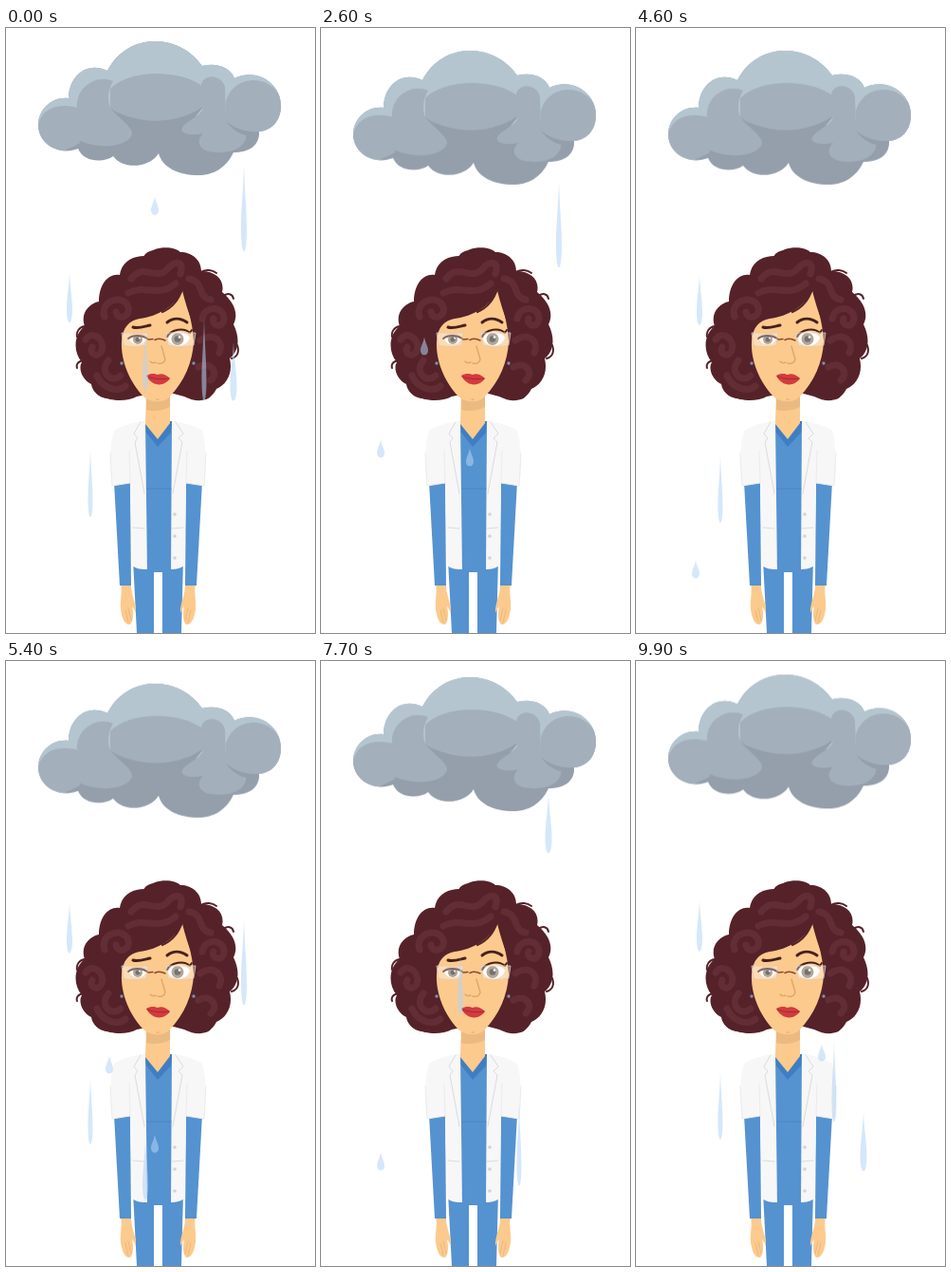
Animation of 326x637 px, one loop 10 s. Source, as an HTML page:

```html
<!DOCTYPE html>
<html lang="en">
<head>
<meta charset="utf-8">
<title>Rainy mood</title>
<style>
  html, body { margin: 0; width: 100%; height: 100%; overflow: hidden; background: #fff; }
  svg { display: block; width: 100vw; height: 100vh; }
  #cloud { animation: bob 1s cubic-bezier(.364, 0, .636, 1) infinite alternate; }
  @keyframes bob { to { transform: translateY(15px); } }
  .line { fill: none; stroke-linecap: round; stroke-linejoin: round; }
</style>
</head>
<body>
<svg viewBox="0 0 326 637">
  <defs>
    <clipPath id="cloudEdge">
      <path id="cloudShape" d="M34 102C34 86 48 72 66 74C66 52 84 34 107 45C118 24 137 14 157 14C180 14 197 26 207 40C221 36 237 41 241 53C262 42 290 56 290 82C290 98 280 108 267 109C268 124 256 131 240 131C232 148 218 155 203 155C182 155 165 147 161 132C152 147 124 150 113 135C104 142 82 142 76 127C56 135 34 122 34 102Z"/>
    </clipPath>
    <clipPath id="hairEdge">
      <path id="hairShape" d="M146 240C158 228 178 230 184 236C196 236 206 244 206 256C222 256 231 266 228 278C240 288 246 300 240 312C247 326 246 340 236 348C240 364 232 376 222 380C216 392 204 396 188 388L173 384L148 386L138 388C124 396 92 392 90 375C80 370 76 358 80 352C70 340 72 322 83 314C78 300 88 290 98 288C98 270 108 258 120 260C122 246 134 240 146 240Z"/>
    </clipPath>
  </defs>

  <g id="body">
    <path fill="#5592d0" d="M134 560H187L185 637H165V573H156V637H138Z"/>
    <g id="side">
      <path fill="#fcca8d" d="M121 584H132C131 596 138 606 137 616C136 614 135 611 133 609C135 618 134 625 131 628C125 629 122 620 121 612C120 602 123 596 121 584Z"/>
      <path class="line" stroke="#e8b377" stroke-width=".8" d="M126 613L129 626M129 611L132 624"/>
      <path fill="#5592d0" d="M114 478H131L132 587H120Z"/>
      <path fill="#f7f7f7" d="M148 413C140 415 126 416 114 424C109 440 109 462 112 482L131 479L133 566C138 570 144 570 149 570Z"/>
      <path class="line" stroke="#ececec" d="M131 479L130 445M110 448L112 482L131 479"/>
    </g>
    <use href="#side" transform="matrix(-1 0 0 1 321 0)"/>
    <path fill="#5592d0" d="M147 414H175L174 573H149Z"/>
    <path class="line" stroke="#4a86c6" d="M149 485H174"/>
    <path fill="#3f7ec3" d="M147 414L148 426L160 441L174 426L175 414Z"/>
    <path fill="#fcca8d" d="M148 384H173V416L160 433L147 417Z"/>
    <path fill="#ebba80" d="M148 386H173V399C166 403 155 404 148 402Z"/>
    <g class="line" stroke="#dcdcdc">
      <path d="M142 415L135 427L139 432L136 436L146 490M179 415L187 427L182 432L186 436L176 490M134 526L146 527M175 527L187 526"/>
    </g>
    <g fill="#d3d3d3">
      <circle cx="178" cy="512" r="1.8"/><circle cx="178" cy="535" r="1.8"/><circle cx="178" cy="558" r="1.8"/>
    </g>
  </g>

  <g id="head">
    <use href="#hairShape" fill="#552229"/>
    <g class="line" stroke="#552229" stroke-width="2">
      <path d="M146 241C149 236 155 235 160 236M204 258C211 253 218 255 222 258M228 283C234 278 239 280 240 285M83 314C77 315 74 320 75 325M82 350C75 351 74 355 75 358M92 374C92 382 98 388 106 389M238 348C245 346 246 340 244 334M208 390C212 391 214 389 216 386"/>
    </g>
    <g class="line" clip-path="url(#hairEdge)" stroke="#632d36" stroke-width="7">
      <path d="M132 264C146 246 158 268 171 253C180 243 188 247 184 259M104 304C98 287 124 279 129 294C132 304 118 309 116 299M129 279C148 269 160 285 179 269M84 328C91 317 105 328 101 340C97 348 87 343 91 336M108 350C98 362 111 375 121 366M193 264C210 267 201 283 216 286M207 306C210 291 230 293 230 306C229 317 216 314 219 306M205 329C218 319 231 330 225 342M203 357C214 350 226 362 216 371M96 366C102 380 118 384 126 377"/>
    </g>
    <path fill="#fcca8d" d="M187 275C180 292 160 304 141 306C130 308 123 315 122 330C121 350 130 372 145 388C153 395 167 395 173 388C188 372 197 352 198 330C197 308 190 290 187 275Z"/>
    <path class="line" stroke="#552229" stroke-width="2.2" d="M186 274C182 288 174 295 165 299M187 276C190 288 193 298 197 308"/>
    <circle cx="122" cy="353" r="1.7" fill="#7d91b0"/><circle cx="198" cy="353" r="1.7" fill="#7d91b0"/>
    <path class="line" stroke="#47211f" stroke-width="3" d="M134 315C139 317 147 314 152 313M170 310C176 305 184 305 191 310"/>
    <path fill="#fff" d="M130 328C133 322 143 321 148 328C144 335 134 335 130 328ZM171 328C173 318 189 317 194 326C191 337 175 337 171 328Z"/>
    <circle cx="139" cy="328" r="5" fill="#8b7b68"/><circle cx="139" cy="328" r="2.5" fill="#33302e"/>
    <circle cx="181" cy="327.500" r="6.500" fill="#8b7b68"/><circle cx="181" cy="327.500" r="3.300" fill="#33302e"/>
    <circle cx="183" cy="325.500" r="1.300" fill="#fff"/><circle cx="141" cy="326.500" r="1" fill="#fff"/>
    <path fill="#edb77d" d="M129 328C131 319 145 319 149 327C143 323 135 323 129 328Z"/>
    <path class="line" stroke="#47211f" stroke-width="2" d="M129 327C134 323 143 323 149 327M170 325C174 317 188 315 194 321L196 318"/>
    <g fill="#fff" fill-opacity=".32" stroke="#d9cbbd" stroke-width=".8">
      <path d="M122 321H150L148 334C140 336 130 336 124 334ZM168 321H200L198 334C190 336 178 336 171 334Z"/>
    </g>
    <path class="line" stroke="#8e4930" stroke-width="1.500" d="M150 328L155 327.500M157 328.500C160 327 164 327 168 329"/>
    <path class="line" stroke="#dfa66c" stroke-width="1.400" d="M164 335L168 349C167 353 163 354 160 353M152 351C154 353 156 353 158 352"/>
    <path fill="#d33b3e" d="M148 366C153 363 157 364 160 365C164 363 169 365 173 369C167 378 154 378 148 366Z"/>
    <path class="line" stroke="#a7282f" d="M149 367C156 370 166 370 172 369"/>
    <path class="line" stroke="#dfa66c" stroke-width="1.200" d="M159 391H161"/>
  </g>

  <g id="cloud">
    <use href="#cloudShape" fill="#959fab"/>
    <g clip-path="url(#cloudEdge)">
      <path fill="#b4c5d0" d="M34 102V10H290V82L232 95L110 85L75 95Z"/>
      <g fill="#a3b0bc">
        <path d="M33 106C36 86 52 78 76 84L78 121C70 126 66 126 61 130H33Z"/>
        <path d="M75 84C73 62 96 48 113 56C107 66 107 76 110 84C126 94 133 102 133 111C131 124 100 130 74 117Z"/>
        <path d="M110 64C130 43 185 43 208 62V85C180 102 140 102 110 85Z"/>
        <path d="M206 60C208 48 227 48 231 62L232 92L253 108C256 122 244 131 224 131C204 131 199 120 208 111C195 114 183 111 186 105C190 97 204 94 208 85Z"/>
        <path d="M232 78C238 50 278 46 290 74V110H267C252 111 238 104 232 96Z"/>
      </g>
      <path fill="#959fab" d="M110 84C119 92 132 97 145 98C164 99 190 96 207 83C203 93 193 97 188 102L170 112L134 112C131 101 117 94 110 84ZM232 98C241 106 254 110 267 109L265 113C251 116 239 108 232 98Z"/>
    </g>
  </g>

  <g id="rain" fill="#b3d3f5"></g>
</svg>
<script>
  const LOOP = 10000, TOP = 140, SPEED = .6, FALL = 833;

  // x, height, width, start times of each fall
  const falling = [
    [157, 19, 8, [-62, 1000, 2097, 3750, 4803, 5850, 7800]],
    [63, 19, 8, [242, 1180, 2112, 2953, 3900, 5450, 6230, 7072, 8100]],
    [109, 19, 8, [1100, 2292, 3750, 4942, 5950, 7800]],
    [196, 18, 8, [930, 3710, 5410, 7750, 9462]],
    [251, 92, 6, [-5, 920, 2567, 3750, 5183, 6030, 7800]],
    [147, 62, 6, [-300, 920, 3267, 4792, 5700, 6550, 7417, 8230]],
    [209, 87, 5, [-275, 550, 1400, 3720, 5420, 6300, 7158, 8200, 9470]],
    [240, 62, 7, [-317, 603, 1480, 3720, 5420, 7700, 8500, 9342]]
  ];

  // x, height, width, first y, drift per cycle
  const drifting = [
    [67, 53, 6, 252, 40],
    [89, 71, 5, 431, 100]
  ];

  const rain = document.getElementById('rain');

  function addDrop(h, w) {
    const el = document.createElementNS('http://www.w3.org/2000/svg', 'path');
    const r = w / 2;
    el.setAttribute('d', `M0 0C${r * .3} ${h * .35} ${r} ${h * .5} ${r} ${h * .75}` +
      `C${r} ${h * 1.08} ${-r} ${h * 1.08} ${-r} ${h * .75}C${-r} ${h * .5} ${-r * .3} ${h * .35} 0 0Z`);
    rain.append(el);
    return el;
  }

  function place(el, x, y, shown) {
    el.setAttribute('transform', `translate(${x} ${y})`);
    el.setAttribute('opacity', shown ? .55 : 0);
  }

  const fallers = falling.map(([x, h, w, starts]) => {
    const el = addDrop(h, w);
    return t => {
      const age = t - starts.filter(s => s <= t).pop();
      place(el, x, TOP + SPEED * (age || 0), age < FALL);
    };
  });

  const drifters = drifting.map(([x, h, w, y, drift]) => {
    const el = addDrop(h, w);
    return t => {
      const phase = (t * 11 / LOOP + .13) % 1;
      place(el, x, y + drift * phase, phase < .3);
    };
  });

  const drops = [...fallers, ...drifters];
  const start = performance.now();

  function draw() {
    const t = (performance.now() - start) % LOOP;
    drops.forEach(update => update(t));
    requestAnimationFrame(draw);
  }
  draw();
</script>
</body>
</html>
```
